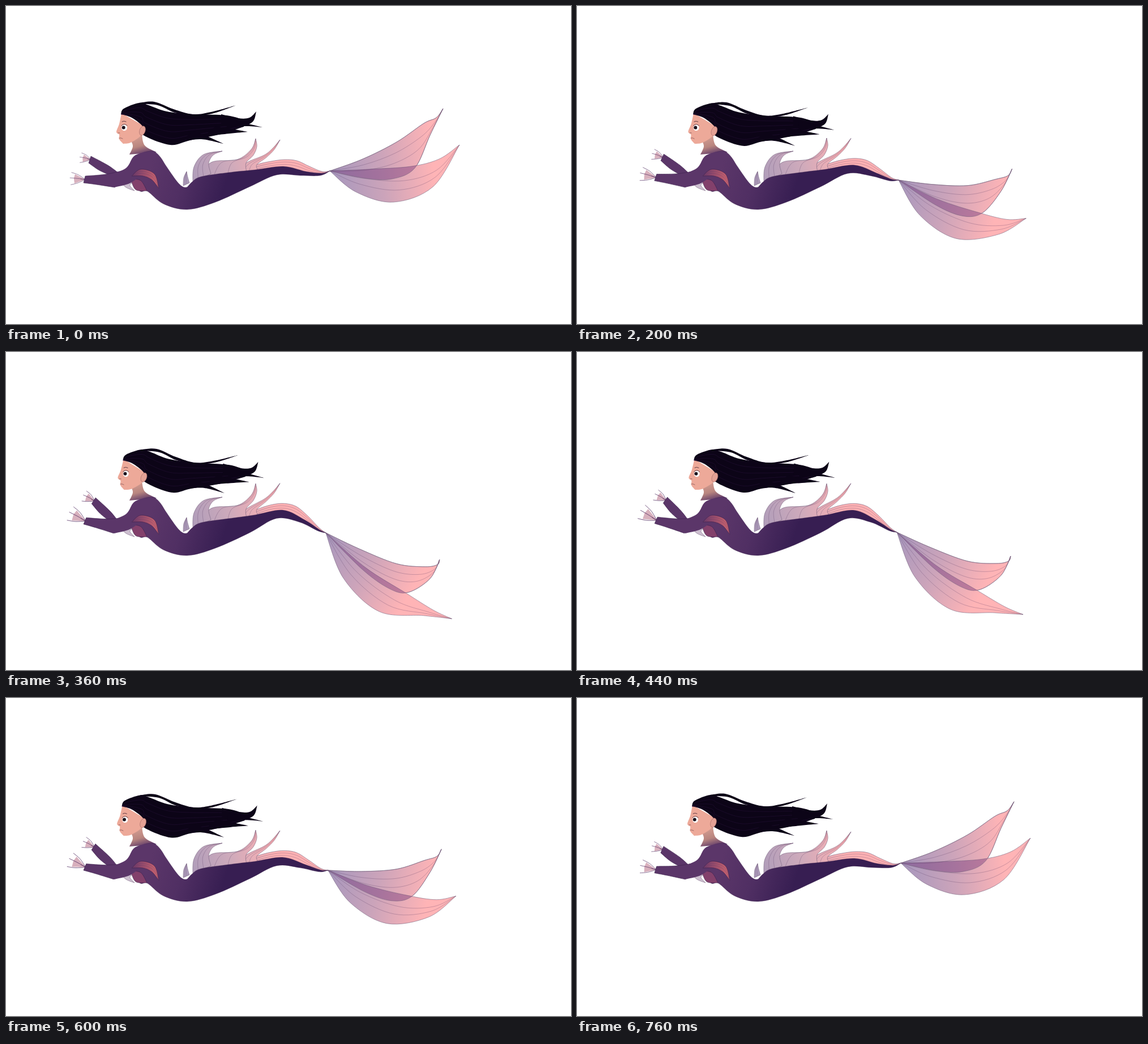
An HTML page for the animation above (800 ms loop, 998 by 561 pixels).

```html
<!DOCTYPE html>
<html lang="en">
<head>
<meta charset="utf-8">
<title>Swimming mermaid</title>
<style>
html, body { margin: 0; width: 100%; height: 100%; overflow: hidden; background: #fff; }
svg { display: block; width: 100vw; height: 100vh; }
path { stroke-width: .6; }
.fin { stroke: #77647f; }
.skin { stroke: #3a1f4b; }
.rib { fill: none; stroke: #5b3f66; stroke-opacity: .5; }
#hair { fill: #0c0417; }
#hair .rib { stroke: #3a1b50; }
.finger { fill: none; stroke: #553164; stroke-linecap: round; stroke-linejoin: round; }
.web { fill: #d8b0bd; }
.mark { fill: none; stroke: #53303a; stroke-width: .9; stroke-linecap: round; }
</style>
</head>
<body>
<svg viewBox="0 0 998 561">
  <defs>
    <linearGradient id="silk" gradientUnits="userSpaceOnUse" x1="575" y1="291" x2="755" y2="291">
      <stop offset="0" stop-color="#a797bd"/><stop offset=".5" stop-color="#cca4ba"/><stop offset="1" stop-color="#ffb4b6"/>
    </linearGradient>
    <linearGradient id="dorsal" gradientUnits="userSpaceOnUse" x1="322" y1="310" x2="475" y2="280">
      <stop offset="0" stop-color="#ad9cba"/><stop offset=".5" stop-color="#ceaabb"/><stop offset="1" stop-color="#fdb1b3"/>
    </linearGradient>
    <linearGradient id="body" gradientUnits="userSpaceOnUse" x1="255" y1="285" x2="385" y2="325">
      <stop offset="0" stop-color="#5b3669"/><stop offset=".45" stop-color="#502f63"/><stop offset="1" stop-color="#371e52"/>
    </linearGradient>
    <linearGradient id="neck" gradientUnits="userSpaceOnUse" x1="234" y1="232" x2="242" y2="262">
      <stop offset="0" stop-color="#cf998e"/><stop offset=".5" stop-color="#b8857f"/><stop offset="1" stop-color="#5f3a6a"/>
    </linearGradient>
    <linearGradient id="gill">
      <stop offset="0" stop-color="#6d3869"/><stop offset="1" stop-color="#d0666f"/>
    </linearGradient>
    <clipPath id="upperClip"></clipPath>
  </defs>
  <g id="backArm"><g id="backHand"></g></g>
  <g id="tail"></g>
  <g id="torso"></g>
  <g id="head">
    <g id="face"></g>
    <ellipse cx="209" cy="214.5" rx="5" ry="5.5" fill="#fff"/>
    <circle cx="207.7" cy="214.5" r="3" fill="#1b121c"/>
    <path class="mark" d="M204 211q5-5 10 0M205 204q3-2 7 0"/>
    <path class="mark" stroke-opacity=".6" d="M200 233q3-1 6 1M198 224q2-1 3 0"/>
    <g id="hair"></g>
    <ellipse cx="241" cy="220" rx="5" ry="8.5" fill="#e4a195" stroke="#96605f" stroke-width=".5" transform="rotate(18 241 220)"/>
  </g>
  <g id="foreArm"><g id="foreHand"></g></g>
  <g id="shoulder"></g>
</svg>
<script>
const $ = id => document.getElementById(id);
const leaves = [];
const rad = deg => deg * Math.PI / 180;
const points = s => s.split(' ').map(p => p.split(',').map(Number));
const blend = (a, b, k) => a.map((p, i) => p.map((v, j) => v + (b[i][j] - v) * k));

function add(parent, attrs) {
  const el = document.createElementNS('http://www.w3.org/2000/svg', 'path');
  for (const name in attrs) el.setAttribute(name, attrs[name]);
  return $(parent).appendChild(el);
}

// Smooth cubic segments through all points, without the opening move.
function curve(p) {
  let d = '';
  for (let i = 0; i < p.length - 1; i++) {
    const b = p[i], c = p[i + 1], a = p[i - 1] || b, e = p[i + 2] || c;
    const c1 = b.map((v, j) => v + (c[j] - a[j]) / 6);
    const c2 = c.map((v, j) => v - (e[j] - b[j]) / 6);
    d += `C${c1} ${c2} ${c}`;
  }
  return d;
}

// Two edges from root to tip; ribs run between them at the given fractions.
function leaf(parent, attrs, edges, ribs = [], pose = e => e) {
  const rest = edges.map(points);
  const outline = add(parent, attrs);
  const lines = ribs.map(() => add(parent, { class: 'rib' }));
  leaves.push(k => {
    const [top, bottom] = pose(rest, k);
    const back = [...bottom].reverse();
    outline.setAttribute('d', `M${top[0]}${curve(top)}L${back[0]}${curve(back)}Z`);
    lines.forEach((line, i) => {
      const rib = blend(top, bottom, ribs[i]);
      line.setAttribute('d', `M${rib[0]}${curve(rib)}`);
    });
  });
}

// The rear of the body dips towards the joint and arches before it.
function swim(edges, k) {
  return edges.map(edge => edge.map(([x, y]) => {
    const s = Math.max(0, (x - 430) / 142);
    return [x - 7 * k * s ** 4, y + k * (27 * s ** 3 - 24 * s * (1 - s))];
  }));
}

const sweepTo = low => {
  const end = low.map(points);
  return (edges, k) => edges.map((edge, i) => blend(edge, end[i], k));
};

// Tail fins
const upper = ['572,291 630,270 690,240 738,207 760,197 772,181', '572,291 635,304 682,305 722,286 749,228 772,181'];
const upperSweep = sweepTo(['565,318 625,345 690,369 740,373 762,369 766,360', '565,318 632,383 680,415 712,419 749,394 766,360']);
const lower = ['572,291 640,288 715,283 765,270 801,245', '572,291 618,328 684,346 754,319 801,245'];
const lowerSweep = sweepTo(['565,318 635,377 706,420 755,449 788,463', '565,318 597,397 660,454 738,460 788,463']);
const silk = { class: 'fin', fill: 'url(#silk)' };
leaf('upperClip', {}, upper, [], upperSweep);
leaf('tail', silk, upper, [], upperSweep);
leaf('tail', silk, lower, [.4, .66], lowerSweep);
leaf('tail', { fill: '#6a2a72', 'fill-opacity': .4, 'clip-path': 'url(#upperClip)' }, lower, [], lowerSweep);
leaf('tail', { class: 'fin', fill: 'none' }, upper, [.3, .58], upperSweep);

// Dorsal fin, from the tail ridge forward
[
  ['405,294 442,280 468,274 492,271 514,273 536,283 558,292 572,291', '420,297 445,292 468,287 492,285 514,289 536,296 558,297 572,291'],
  ['405,296 424,277 456,263 471,251 484,236', '445,290 443,280 460,267 474,253 484,236'],
  ['340,308 362,276 408,271 433,253 441,234', '425,293 424,277 437,263 443,248 441,234'],
  ['330,312 332,284 349,262 382,256', '362,296 358,278 366,263 382,256'],
  ['313,317 314,303 319,292', '324,312 321,302 319,292']
].forEach(edges => leaf('tail', { class: 'fin', fill: 'url(#dorsal)' }, edges, [.3, .6], swim));

// Body
leaf('torso', { fill: 'url(#neck)' }, ['221,238 224,248 218,262', '240,226 245,246 266,258']);
leaf('torso', { class: 'fin', fill: '#cdbfd0' }, ['203,311 212,320 227,326', '222,312 219,317 227,326']);
leaf('torso', { class: 'skin', fill: 'url(#body)', 'stroke-opacity': .6 }, [
  '234,262 248,257 262,257 273,267 284,284 305,313 318,320 328,311 345,301 400,293 440,289 490,283 530,292 558,295 572,291',
  '215,300 236,326 250,327 278,349 320,359 370,346 430,319 478,298 520,299 555,299 572,291'
], [], swim);
leaf('torso', { class: 'skin', fill: '#83406b' }, ['220,305 229,324 249,326', '220,305 238,308 249,326']);

// Head
leaf('face', { fill: '#eda999' }, ['204,189 200,208 195,222 200,227 200,235 207,243', '246,213 238,229 220,241 207,243']);
leaf('hair', {}, [
  '203,191 208,181 235,171 252,175 284,186 330,191 390,193 425,203',
  '203,191 222,197 242,213 243,228 290,245 325,237 375,227 420,213'
], [.2, .4, .6, .8]);
[
  ['235,171 262,169 296,182 330,191 362,187 407,175', '235,173 268,175 298,188 330,193 364,190 407,175'],
  ['380,191 410,198 430,197 442,186', '380,212 415,212 436,204 442,186'],
  ['390,200 420,206 453,214', '390,214 425,212 453,214'],
  ['370,212 405,218 427,222', '350,230 395,225 427,222'],
  ['330,220 358,231 384,243', '310,239 345,235 384,243']
].forEach(edges => leaf('hair', {}, edges));

// Arms
function hand(parent, x, y, length, angles) {
  const at = (deg, r) => [x - r * Math.cos(rad(deg)), y - r * Math.sin(rad(deg))];
  add(parent, { class: 'web', d: `M${x},${y}L${angles.map(a => at(a, length * .75)).join('L')}Z` });
  add(parent, { class: 'finger', 'stroke-width': 8, d: `M${x},${y}L${at(angles[1], length * .3)}` });
  for (const a of angles) {
    const path = [[x, y], at(a * 1.25, length * .55), at(a, length)];
    add(parent, { class: 'finger', 'stroke-width': 2.8, d: `M${x},${y}${curve(path)}` });
  }
}
const skin = { class: 'skin', fill: 'url(#body)' };
leaf('backArm', skin, ['198,294 180,281 150,265', '188,300 165,290 146,277']);
hand('backHand', 150, 271, 20, [36, 13, -15]);
leaf('foreArm', skin, ['204,291 175,297 140,300', '192,320 160,315 137,312']);
hand('foreHand', 140, 306, 27, [27, 6, -20]);
leaf('shoulder', { fill: 'url(#body)' }, ['246,257 226,265 213,285 190,296', '262,275 246,292 220,312 191,320']);
leaf('shoulder', { class: 'skin', fill: 'url(#gill)' }, ['222,300 238,288 262,296 270,322', '222,300 242,300 258,307 270,322'], [.3, .6]);

const turn = (id, deg, x, y, size = 1) => $(id).setAttribute('transform',
  `translate(${x} ${y}) rotate(${deg}) scale(${size}) translate(${-x} ${-y})`);

function draw(t) {
  const k = (.984 - Math.cos(rad(10.3 + .44 * t))) / 1.898;
  const lift = (1 - Math.cos(rad(.38 * t))) / 2;
  leaves.forEach(update => update(k));
  $('silk').setAttribute('gradientTransform', `translate(${-7 * k} ${27 * k}) rotate(${35 * k - 5} 572 291)`);
  turn('head', 1.8 * k, 235 + k, 250 + k / 2);
  $('head').setAttribute('transform', `translate(${1.5 * k} ${k}) rotate(${1.8 * k} 235 250)`);
  turn('backArm', 17 * lift, 185, 293);
  turn('backHand', 0, 150, 271, 1 + .15 * lift);
  turn('foreArm', 10 * lift, 192, 308);
  turn('foreHand', 16 * lift, 140, 306, 1 + .25 * lift);
}

// The drawing advances in 40 ms steps.
let shown = -1;
function tick(now) {
  const step = Math.floor(now % 800 / 40);
  if (step !== shown) draw((shown = step) * 40);
  requestAnimationFrame(tick);
}
draw(0);
requestAnimationFrame(tick);
</script>
</body>
</html>
```
